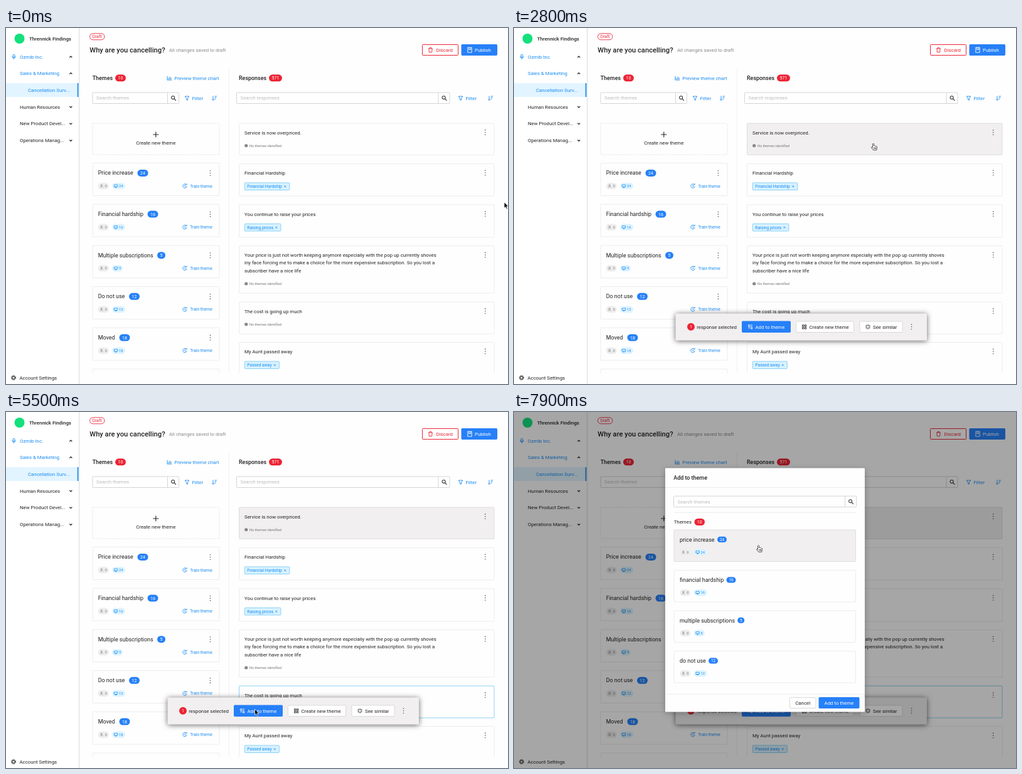
An HTML page for the animation above (8000 ms loop, 800 px wide and 568 px high).

```html
<!DOCTYPE html>
<html lang="en">
<head>
<meta charset="utf-8">
<title>Survey themes</title>
<style>
html, body { margin: 0; width: 100%; height: 100%; overflow: hidden; background: #fff; }
svg { display: block; width: 800px; height: 568px; }
text { font-family: Roboto, sans-serif; white-space: pre; }
#bar > rect:first-child { filter: drop-shadow(0 1px 4px rgba(0,0,0,.6)); }
#modal > rect:first-child { filter: drop-shadow(0 2px 5px rgba(0,0,0,.25)); }
</style>
</head>
<body>
<svg id="stage" viewBox="0 0 800 568"></svg>
<script>
const LOOP = 8000, SELECT = 2600, OPEN = 5600, PICK = 7500, STEP = 100, HOVER_LAG = 100;
const INK = '#222', BLUE = '#2680f8', LINK = '#188cf2', RED = '#ec2435', GREY = '#f1eff0', LINE = '#ececec';
const BODY = 7.85, LARGE = 8.95, SMALL = 6.72, TINY = 5.55;

// Drawing helpers
const text = (x, y, s, size = BODY, fill = INK, extra = '') =>
  `<text x="${x}" y="${y}" font-size="${size}" fill="${fill}" ${extra}>${s}</text>`;
const bold = 'font-weight="500"', mid = 'text-anchor="middle"';
const rect = (x, y, w, h, fill = '#fff', stroke = 'none', rx = 1, extra = '') =>
  `<rect x="${x}" y="${y}" width="${w}" height="${h}" rx="${rx}" fill="${fill}" stroke="${stroke}" ${extra}/>`;
const path = (x, y, d, color = INK, width = 1, fill = 'none') =>
  `<path transform="translate(${x} ${y})" d="${d}" fill="${fill}" stroke="${color}" stroke-width="${width}"/>`;
const group = (id, body) => `<g id="${id}">${body}</g>`;
const pill = (x, cy, s, fill, w = 17, h = 11, size = 7) =>
  rect(x, cy - h / 2, w, h, fill, 'none', h / 2) + text(x + w / 2, cy + size * .36, s, size, '#fff', mid);
const dots = (x, cy) => [-3.7, 0, 3.7].map(d => `<circle cx="${x}" cy="${cy + d}" r=".8" fill="#555"/>`).join('');

const ICON = {
  search: 'M1.2 1.2 L4 4 M1.7 -.8 A2.5 2.5 0 1 1 -3.3 -.8 A2.5 2.5 0 1 1 1.7 -.8',
  filter: 'M-3.3 -3 H3.3 L1 .2 V3.2 L-1 2.4 V.2 Z',
  sort: 'M-2 -3.5 V3.3 M-3.8 1.5 L-2 3.5 L-.2 1.5 M.5 -3 H4 M.5 -.8 H3.2 M.5 1.4 H2.2',
  chart: 'M-3.5 -3.3 V3 H3.8 M-1.5 2 V-.3 M.5 2 V-2.3 M2.5 2 V-1.2',
  trash: 'M-3.4 -2.2 H3.4 M-1.3 -2.3 V-3.7 H1.3 V-2.3 M-2.5 -2 L-2.2 3.7 H2.2 L2.5 -2',
  file: 'M-3.2 -4 H3.2 V4 H-3.2 Z M-1.2 -4 V0 L.2 -1 L1.6 0 V-4',
  user: 'M1.1 -1 A1.1 1.1 0 1 1 -1.1 -1 A1.1 1.1 0 1 1 1.1 -1 M-2 2.4 Q0 -1 2 2.4',
  screen: 'M-2.7 -2 H2.7 V1.3 H-2.7 Z M-1.2 2.4 H1.2 M0 1.3 V2.4',
  clock: 'M2.5 -2.1 A3.2 3.2 0 1 0 3.2 .4 M0 -1.8 V.3 L1.6 1 M1.4 -2.3 H3.2 V-3.9',
  blocks: 'M-3 -3 H-.6 V-.6 H-3 Z M.9 -3 H3.3 V-.6 H.9 Z M-3 .9 H-.6 V3.3 H-3 Z M.9 .9 H3.3 V3.3 H.9 Z',
  add: 'M-3 -3 H-.4 V0 H-3 Z M1 -3 H3.3 M1 -.8 H3.3 M-3 2 H-.4 M1.2 1 H3.2 V3.2 H1.2 Z',
  shrink: 'M-3.7 -1.2 H-1.2 V-3.7 M1.2 -3.7 V-1.2 H3.7 M-3.7 1.2 H-1.2 V3.7 M1.2 3.7 V1.2 H3.7',
  down: 'M-2 -1 L0 1 L2 -1',
  up: 'M-2 1 L0 -1 L2 1',
  plus: 'M-4.5 0 H4.5 M0 -4.5 V4.5',
  cross: 'M-1.5 -1.5 L1.5 1.5 M1.5 -1.5 L-1.5 1.5',
  mic: 'M-1.5 -3 Q0 -4.8 1.5 -3 V.3 H-1.5 Z M-2.7 -.5 Q-2.5 2 0 2 Q2.5 2 2.7 -.5 M0 2 V4'
};
const icon = (name, x, y, color = LINK, width = .9) => path(x, y, ICON[name], color, width);

const badges = (x, cy, n) => {
  const w = 13 + String(n).length * 3.9;
  return rect(x, cy - 5.2, 17, 10.4, '#eeeded', 'none', 5.2) + icon('user', x + 5.6, cy, '#777', .7) +
    text(x + 11, cy + 2, '0', TINY, '#777') +
    rect(x + 22.5, cy - 5.2, w, 10.4, '#ddf3ff', 'none', 5.2) + icon('screen', x + 28.3, cy, LINK, .8) +
    text(x + 33.3, cy + 2, n, TINY + .2, LINK);
};
const searchBox = (x, y, w, label) =>
  rect(x, y, w, 17.5, '#fff', '#d5d5d5') + path(x + w - 18, y, 'M0 0 V17.5', '#d5d5d5') +
  text(x + 6, y + 11.4, label, BODY, '#bbb') + icon('search', x + w - 8.6, y + 8.8, '#333', 1.1);
const button = (x, y, w, h, label, name, color = INK, fill = '#fff', stroke = '#d9d9d9', tx = 21) =>
  rect(x, y, w, h, fill, stroke) + icon(name, x + 13, y + h / 2, color) + text(x + tx, y + h / 2 + 2.8, label, BODY, color);

// Page content
const themes = [['Price increase', 24, 209.5], ['Financial hardship', 16, 225.5],
  ['Multiple subscriptions', 5, 241], ['Do not use', 12, 196], ['Moved', 18, 180.5]];
const responses = [
  { y: 152, h: 50.5, lines: ['Service is now overpriced.'] },
  { y: 216.5, h: 51.5, lines: ['Financial Hardship'], tag: 'Financial Hardship', w: 71.5 },
  { y: 282, h: 52, lines: ['You continue to raise your prices'], tag: 'Raising prices', w: 57.5 },
  { y: 347.5, h: 75.5, lines: ['Your price is just not worth keeping anymore especially with the pop up currently shoves',
    'iny face forcing me to make a choice for the more expensive subscription. So you lost a', 'subscriber have a nice life'] },
  { y: 437, h: 51, lines: ['The cost is going up much'] },
  { y: 501.5, h: 60, lines: ['My Aunt passed away'], tag: 'Passed away', w: 55 }
];

const sidebar = () => {
  const rows = [[22, 46, 'Ozmib Inc.', LINK, 'up'], [22, 72.5, 'Sales &amp; Marketing', LINK, 'up'],
    [35, 99, 'Cancellation Surv...', LINK], [22, 126, 'Human Resources', INK, 'down'],
    [22, 152.7, 'New Product Devel...', INK, 'down'], [22, 179.5, 'Operations Manag...', INK, 'down']];
  return rect(115, 0, 3, 568, '#f0f0f1', 'none', 0) + rect(0, 0, 116, 568, '#fff', 'none', 0) +
    path(116.2, 0, 'M0 0 V568', '#e8e8ea') +
    '<circle cx="21.5" cy="17" r="8" fill="#14e07c"/>' +
    text(37, 19.8, 'Thrennick Findings', BODY, INK, bold) +
    rect(0, 88, 115.5, 22, '#e2f4ff', 'none', 0) + rect(113.7, 88, 1.8, 22, LINK, 'none', 0) +
    icon('mic', 12.5, 46) +
    rows.map(([x, y, s, c, arrow]) => text(x, y + 2.6, s, BODY, c) + (arrow ? icon(arrow, 103.3, y, '#222', 1.2) : '')).join('') +
    '<circle cx="12" cy="558" r="3.1" fill="none" stroke="#333" stroke-width="1.5" stroke-dasharray="1.7 .75"/>' +
    '<circle cx="12" cy="558" r="1.9" fill="#fff" stroke="#333" stroke-width=".9"/>' +
    text(21.5, 560.7, 'Account Settings');
};

const header = () =>
  rect(133.5, 8.8, 23.5, 10, '#fff', RED, 5, 'stroke-width=".9"') + text(145.2, 16.2, 'Draft', SMALL, RED, mid) +
  text(133.3, 38.8, 'Why are you cancelling?', 11.2, INK, bold) +
  text(260, 37.8, 'All changes saved to draft', BODY, '#888') +
  button(663.5, 26.5, 57, 17, 'Discard', 'trash', RED, '#fff', RED, 22) +
  button(726, 26.5, 56.5, 17, 'Publish', 'file', '#fff', BLUE, BLUE) +
  path(355.5, 65, 'M0 0 V486', '#f0f0f0') +
  text(137.7, 82.8, 'Themes', LARGE, INK, bold) + pill(174, 79.8, 10, RED) +
  icon('chart', 260.5, 80) + text(268.2, 82.7, 'Preview theme chart', BODY, LINK) +
  text(371, 82.8, 'Responses', LARGE, INK, bold) + pill(419, 79.8, 571, RED, 21) +
  searchBox(138, 103, 137.5, 'Search themes') + searchBox(367.5, 103, 339.5, 'Search responses') +
  [[288.5, 332], [724.5, 772]].map(([x, x2]) =>
    icon('filter', x, 112) + text(x + 8, 114.7, 'Filter', BODY, LINK) + icon('sort', x2, 112)).join('');

const themeList = () =>
  rect(138, 152, 202, 50, '#fefefe', '#dcdcdc', 1, 'stroke-dasharray="2 1.4" stroke-width=".8"') +
  icon('plus', 238.8, 170, INK, 1.1) + text(238.8, 186.3, 'Create new theme', BODY, INK, mid) +
  themes.map(([name, n, px], i) => {
    const y = 215.7 + i * 65.65;
    return rect(138, y, 202, 51.8, '#fefefe', LINE) + text(146.7, y + 18.7, name, LARGE) +
      pill(px, y + 15.7, n, BLUE, n < 10 ? 13 : 17) + dots(325.5, y + 15.8) + badges(146.7, y + 36.4, n) +
      icon('clock', 285, y + 36.4) + text(293.3, y + 38.8, 'Train theme', SMALL, LINK);
  }).join('') + rect(138, 544, 202, 52, '#fefefe', LINE);

const responseList = () => responses.map((r, i) => {
  const foot = r.y + 35.8 + (r.lines.length - 1) * 12.3;
  return rect(371.5, r.y, 406.5, r.h, '#fefefe', LINE, 1, `id="resp${i}"`) +
    r.lines.map((s, k) => text(380, r.y + 17.6 + k * 12.3, s)).join('') + dots(763.7, r.y + 14.6) +
    (r.tag
      ? rect(380.3, foot - 5.4, r.w, 11.6, '#d8f2ff', '#72c8f4', 1, 'stroke-width=".8"') +
        text(384.3, foot + 2.8, r.tag, SMALL, LINK) + icon('cross', 380.3 + r.w - 7, foot + .5, LINK, .8)
      : `<circle cx="382.7" cy="${foot}" r="2.5" fill="#777"/>` + path(382.7, foot, 'M0 -1.4 V1.4', '#ddd', .6) +
        text(388, foot + 2, 'No themes identified', TINY, '#777'));
}).join('');

const actionBar = () => rect(257.5, 455.5, 400.5, 43, GREY, 'none', 2) +
  '<circle cx="282" cy="476.8" r="6" fill="' + RED + '"/>' + text(282, 479.4, 1, 7, '#fff', mid) +
  text(291.2, 479.5, 'response selected') +
  button(363.5, 468, 77, 17.5, 'Add to theme', 'add', '#fff', BLUE, BLUE) +
  button(449.5, 468, 92, 17.5, 'Create new theme', 'blocks') +
  button(551, 468, 68, 17.5, 'See similar', 'shrink') + dots(633.5, 476.8);

const modalY = i => 188 + i * 64.5;
const modalPills = [324, 338.5, 356.2, 310];
const modal = () => rect(241, 89.5, 318, 389, '#fefefe', 'none', 1) +
  text(254.2, 107.6, 'Add to theme', LARGE, INK, bold) +
  path(241, 120.5, 'M0 0 H318 M14 39.8 H304 M0 329.7 H318', LINE) +
  searchBox(254.5, 134.2, 291, 'Search themes') +
  text(254.7, 178.4, 'Themes') + pill(287.5, 175.5, 10, RED, 16.5) +
  modalPills.map((px, i) => {
    const [name, n] = themes[i], y = modalY(i);
    return rect(255, y, 289.5, 50.5, '#fefefe', LINE, 1, `id="pick${i}"`) + text(264, y + 18.5, name.toLowerCase(), LARGE) +
      pill(px, y + 15.4, n, BLUE, n < 10 ? 11 : 15, 9.2, 6.4) + badges(264.3, y + 35.7, n);
  }).join('') +
  rect(439.5, 455.5, 41.5, 17, '#fff', '#d9d9d9') + text(460.2, 466.8, 'Cancel', BODY, INK, mid) +
  rect(486, 455.5, 64, 17, BLUE, BLUE) + text(518, 466.8, 'Add to theme', BODY, '#fff', mid);

const arrow = path(0, 0, 'M0 0 V9.3 L2.1 7.4 L3.7 10.8 L5.2 10.1 L3.7 6.8 H6.5 Z', '#fff', .7, '#000');
const hand = path(0, 0, 'M-1 1 Q0 -1 1 1 V4 Q2.3 3 3 4.5 Q4.3 3.7 4.8 5 Q6.3 4.6 6 6.5 L5.2 10.8 H.3 L-3 6.8 Q-3 5 -1 6.6 Z M1.2 6.5 V9 M2.7 6.5 V9 M4.1 6.5 V9', '#222', .8, '#fff');

document.getElementById('stage').innerHTML =
  '<clipPath id="list"><rect x="130" y="145" width="660" height="405.5"/></clipPath>' +
  rect(0, 0, 800, 568, '#fefefe', 'none', 0) + sidebar() + header() +
  `<g clip-path="url(#list)">${themeList()}${responseList()}</g>` +
  group('bar', actionBar()) + group('mask', rect(0, 0, 800, 568, 'rgba(0,0,0,.35)', 'none', 0)) + group('modal', modal()) +
  group('cursor', group('arrow', arrow) + group('hand', hand));

// Pointer path: time, x, y, easing towards this point
const smooth = u => u * u * (3 - 2 * u), speedUp = u => u * u, slowDown = u => u * (2 - u), steady = u => u;
const track = [[0, 794, 278, steady], [900, 573, 185, smooth], [2800, 572.5, 184, steady], [4000, 420, 415, speedUp],
  [4100, 400, 459, steady], [4300, 396.5, 474, slowDown], [5700, 396.5, 474, steady], [6900, 389.5, 212.5, smooth]];

function pointer(t) {
  const i = track.findIndex(k => k[0] > t);
  if (i < 0) return track.at(-1).slice(1, 3);
  if (i === 0) return track[0].slice(1, 3);
  const [t0, x0, y0] = track[i - 1], [t1, x1, y1, ease] = track[i];
  const u = ease((t - t0) / (t1 - t0));
  return [x0 + (x1 - x0) * u, y0 + (y1 - y0) * u];
}

const el = id => document.getElementById(id);
const show = (id, on) => el(id).setAttribute('visibility', on ? 'visible' : 'hidden');
const inside = (v, from, size) => v >= from && v <= from + size;
const responseAt = ([x, y]) => inside(x, 371, 407) ? responses.findIndex(r => inside(y, r.y, r.h)) : -1;
const pickAt = ([x, y]) => inside(x, 255, 290) ? modalPills.findIndex((_, i) => inside(y, modalY(i), 50.5)) : -1;

function paintCard(id, selected, hovered) {
  el(id).setAttribute('fill', selected ? GREY : '#fefefe');
  el(id).setAttribute('stroke', selected ? '#dedede' : hovered ? '#8dd3f2' : LINE);
}

function draw(t) {
  const open = t >= OPEN, pos = pointer(t);
  // The action bar keeps the card beneath it highlighted
  const [hx, hy] = pointer(Math.min(t, OPEN) - HOVER_LAG);
  const hovered = responseAt([hx, t >= SELECT ? Math.min(hy, 454) : hy]);
  responses.forEach((_, i) => paintCard('resp' + i, i === 0 && t >= SELECT, i === hovered));
  const picked = open ? pickAt(pos) : -1;
  modalPills.forEach((_, i) => paintCard('pick' + i, i === 0 && t >= PICK, i === picked));
  show('bar', t >= SELECT);
  show('mask', open);
  show('modal', open);
  const onCard = open ? picked >= 0 : responseAt(pos) >= 0 && !(t >= SELECT && pos[1] > 455);
  show('arrow', !onCard);
  show('hand', onCard);
  el('cursor').setAttribute('transform', `translate(${pos[0]} ${pos[1]})`);
}

const start = performance.now();
function tick() {
  const t = (performance.now() - start) % LOOP;
  draw(Math.floor(t / STEP) * STEP);
  requestAnimationFrame(tick);
}
tick();
</script>
</body>
</html>
```
